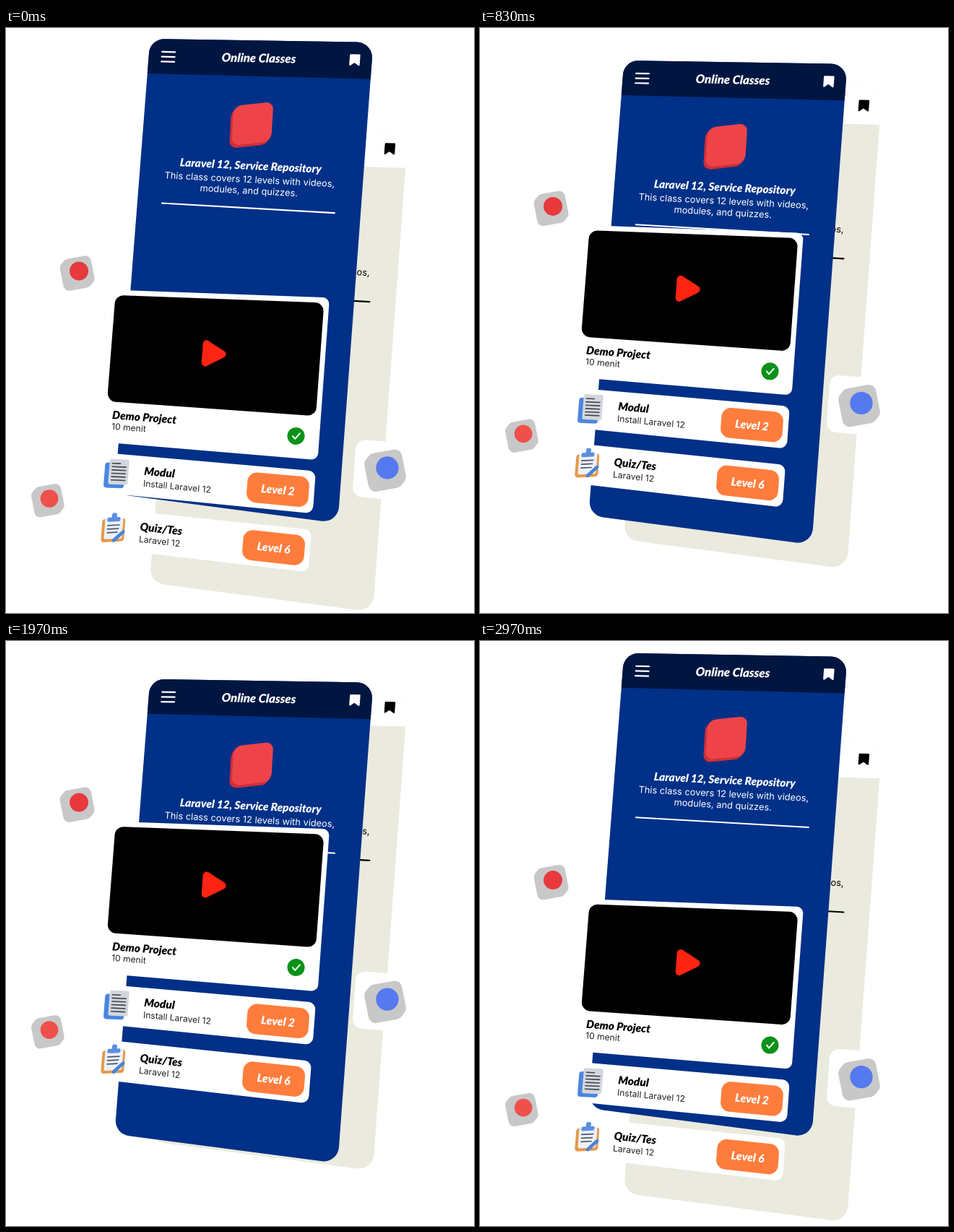
Animation, 648 px wide and 810 px high, one loop 3.01 s. Source, as an HTML page with a canvas:

```html
<!DOCTYPE html>
<html lang="en">
<head>
<meta charset="utf-8">
<title>Online Classes</title>
<style>
  html, body { margin: 0; width: 100%; height: 100%; overflow: hidden; background: #fff; }
  canvas { display: block; }
</style>
</head>
<body>
<canvas id="stage" width="648" height="810"></canvas>
<script>
const ctx = document.getElementById('stage').getContext('2d');
const LOOP = 3010, FPS = 30, FRAMES = 90;
const SPEED = 3.585;   // pixels the cards rise per frame
const LEAN = 0.078;    // sideways shift per pixel of height
const heavy = size => `italic 900 ${size}px Lato, sans-serif`;
const body = size => `${size}px Inter, sans-serif`;

// Layout is flat (u, v); the plane tilts it, rows growing steeper further down.
let plane;
const slope = v => plane.tilt + plane.growth * v;
const project = (u, v) => [plane.x + u - LEAN * v, plane.y + v + u * slope(v)];

// Rounded polygon through flat corner points.
function shape(corners, r, fill) {
  const pts = corners.map(c => project(...c));
  const last = pts[pts.length - 1];
  ctx.beginPath();
  ctx.moveTo((pts[0][0] + last[0]) / 2, (pts[0][1] + last[1]) / 2);
  pts.forEach((p, i) => ctx.arcTo(...p, ...pts[(i + 1) % pts.length], r));
  ctx.closePath();
  ctx.fillStyle = fill;
  ctx.fill();
}

const box = (u, v, w, h, r, fill) =>
  shape([[u, v], [u + w, v], [u + w, v + h], [u, v + h]], r, fill);

// Draws around a point of the plane, following its tilt there.
function local(u, v, draw, turn = 0) {
  ctx.save();
  ctx.transform(1, slope(v) + turn, -LEAN, 1, ...project(u, v));
  draw();
  ctx.restore();
}

function text(str, u, v, font, color, align = 'left') {
  local(u, v, () => {
    ctx.font = font;
    ctx.fillStyle = color;
    ctx.textAlign = align;
    ctx.fillText(str, 0, 0);
  });
}

function slab(x, y, w, h, r, fill) {
  ctx.beginPath();
  ctx.roundRect(x, y, w, h, r);
  ctx.fillStyle = fill;
  ctx.fill();
}

function dot(x, y, r, fill) {
  slab(x - r, y - r, 2 * r, 2 * r, r, fill);
}

function stroke(points, color, width) {
  ctx.beginPath();
  points.forEach(p => ctx.lineTo(...p));
  ctx.strokeStyle = color;
  ctx.lineWidth = width;
  ctx.lineCap = ctx.lineJoin = 'round';
  ctx.stroke();
}

// Thick 3D tile: its side is the face repeated towards the lower left.
function tile(x, y, size, skewY, skewX, depth, side, face, mark) {
  ctx.save();
  ctx.translate(x, y);
  for (let i = depth; i >= 0; i--) {
    ctx.save();
    ctx.transform(1, skewY, skewX, 1, -i * 0.8, i);
    slab(-size / 2, -size / 2, size, size, size * 0.2, i ? side : face);
    ctx.restore();
  }
  if (mark) dot(0, 0, size / 3, mark);
  ctx.restore();
}

const whiteTile = (x, y, size, mark) =>
  tile(x, y, size, -0.18, 0.2, size / 7, '#c8c8c8', '#f5f5f5', mark);

function phone(x, y, back, header, ink) {
  plane = { x, y, tilt: 0.016, growth: 0.000183 };
  const width = 309, mid = 152.5;
  box(0, 0, width, 630, 21, back);
  ctx.save();
  ctx.clip();
  box(-9, -9, width + 18, 57, 0, header);
  ctx.restore();

  for (let i = 0; i < 3; i++) box(17, 16.5 + i * 6.7, 20, 2.2, 1, ink);
  text('Online Classes', mid, 29.3, heavy(16.6), ink, 'center');
  shape([[278, 16], [292.5, 16], [292.5, 32], [285, 27], [278, 32]], 1.2, ink);

  tile(...project(150.5, 112), 55, -0.11, -0.06, 4, '#cf2f38', '#ee4449');

  text('Laravel 12, Service Repository', mid, 173.7, heavy(15.3), ink, 'center');
  text('This class covers 12 levels with videos,', mid, 191.4, body(12.8), ink, 'center');
  text('modules, and quizzes.', mid, 206.4, body(12.8), ink, 'center');
  box(33, 224.5, 241, 2, 1, ink);
}

function videoCard() {
  box(0, 0, 302, 210.5, 9, '#fff');
  box(6, 7, 289, 147, 12, '#000');
  shape([[132, 59.5], [170, 80.5], [132, 101.5]], 5, '#ff2412');
  text('Demo Project', 14.7, 177.5, heavy(15.3), '#000');
  text('10 menit', 14.7, 192, body(12.1), '#222');
  local(269.7, 181.7, () => {
    dot(0, 0, 12, '#0a9118');
    stroke([[-4.5, 0.5], [-1, 4], [5, -4]], '#fff', 2);
  });
}

function lessonCard(v, title, note, level) {
  box(0, v, 300.5, 55, 10, '#fff');
  text(title, 64.6, v + 25.2, heavy(15.3), '#000');
  text(note, 64.4, v + 41, body(12.1), '#222');
  box(207.5, v + 8.5, 85.5, 39.7, 13, '#ff7d3c');
  text(level, 250.3, v + 34, heavy(15.7), '#fff', 'center');
}

function documentIcon() {
  slab(-17, -14, 28, 35, 4, '#4a86e0');
  slab(-11, -19, 27, 35, 3, '#d3d6dc');
  for (let i = 0; i < 6; i++)
    stroke([[-7, -13 + i * 4.6], [i ? 12 : 4, -13 + i * 4.6]], '#3d434d', 1.6);
}

function clipboardIcon() {
  slab(-15, -13, 32, 32, 4, '#e39a4b');
  slab(-11, -14, 25, 29, 3, '#eef1f8');
  slab(-8, -15, 18, 6, 2, '#5a8fe2');
  slab(-2, -21, 7, 9, 3, '#5a8fe2');
  for (let i = 0; i < 3; i++)
    stroke([[-7, -4 + i * 5], [9 - i, -4 + i * 5]], '#4a566e', 1.7);
  stroke([[15, 6], [3, 17]], '#4a83da', 5);
}

function cards(y) {
  plane = { x: 146, y, tilt: 0.036, growth: 0.000225 };
  const first = 225, second = first + 76;
  videoCard();
  lessonCard(first, 'Modul', 'Install Laravel 12', 'Level 2');
  lessonCard(second, 'Quiz/Tes', 'Laravel 12', 'Level 6');
  local(27, first + 26, documentIcon, -0.05);
  local(27, second + 26, clipboardIcon, -0.16);
  box(353, 180, 86, 73, 13, '#fff');
}

function draw(t) {
  const k = Math.min(FRAMES - 1, Math.floor((t + 5) * FPS / 1000));
  const rise = SPEED * Math.min(k, FRAMES + 0.5 - k);

  ctx.fillStyle = '#fff';
  ctx.fillRect(0, 0, 648, 810);
  phone(248, 138 - rise * 2 / 3, '#ebeade', '#fff', '#000');
  phone(199.5, 15 + rise / 3, '#003087', '#001540', '#fff');
  cards(362.5 - rise);
  whiteTile(101, 336.5 - rise, 39, '#e8393d');
  whiteTile(60, 651.5 - rise, 37, '#f0504a');
  whiteTile(528, 609 - rise, 47, '#5579ee');
}

function tick() {
  draw(performance.now() % LOOP);
  requestAnimationFrame(tick);
}
tick();
</script>
</body>
</html>
```
